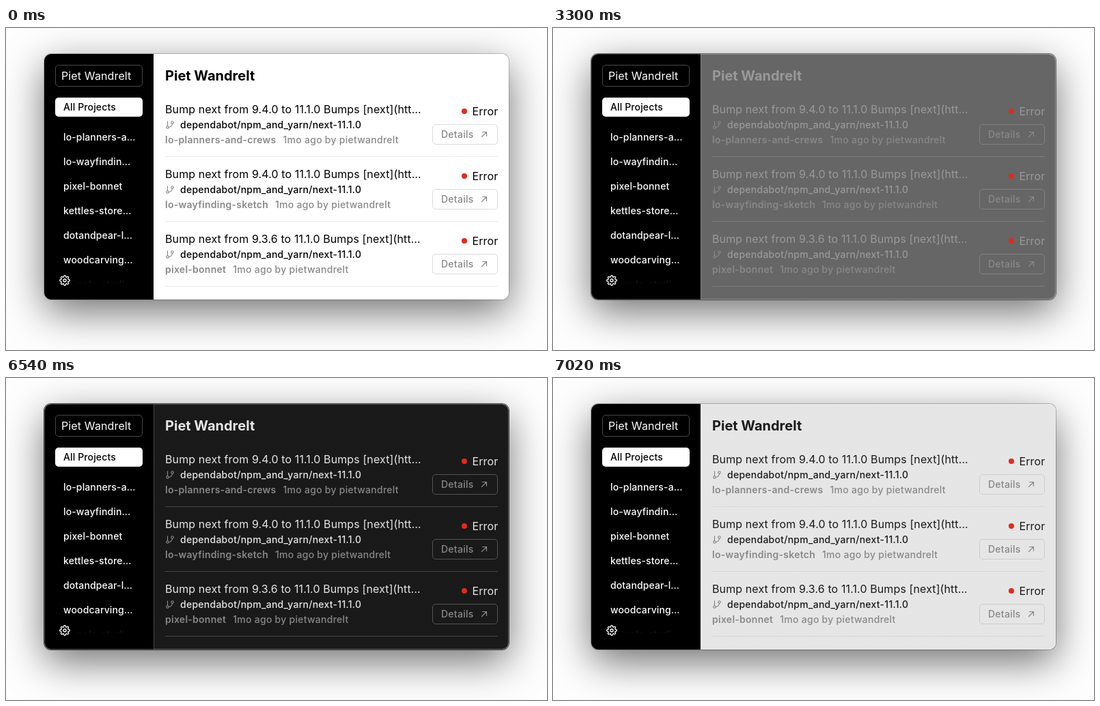
Recreate the animation shown at these times as an HTML page. Size 792 by 472 pixels, loop 7.08 s.

```html
<!DOCTYPE html>
<html lang="en">
<head>
<meta charset="utf-8">
<title>Deployments theme toggle</title>
<style>
  /* 0% is the light theme, 100% the dark one */
  @property --mix {
    syntax: "<percentage>";
    inherits: true;
    initial-value: 0%;
  }

  html, body {
    margin: 0;
    width: 100%;
    height: 100%;
    overflow: hidden;
    background: #fefefe;
  }

  .stage {
    --bg: color-mix(in srgb, #000 var(--mix), #fff);
    --fg: color-mix(in srgb, #fff var(--mix), #000);
    --rule: color-mix(in srgb, #333 var(--mix), #eaeaea);
    --outline: color-mix(in srgb, #444 var(--mix), #dcdcdc);
    --split: color-mix(in srgb, #333 var(--mix), #fff);
    --main-edge: color-mix(in srgb, #4c4c4c var(--mix), #fff);
    --side-edge: color-mix(in srgb, #4c4c4c var(--mix), #000);
    --ring: color-mix(in srgb, rgb(0 0 0 / .75) var(--mix), rgb(0 0 0 / .2));
    position: relative;
    width: 792px;
    height: 472px;
    overflow: hidden;
    animation: theme 7080ms infinite;
  }

  @keyframes theme {
    0% { --mix: 0%; animation-timing-function: step-end; }
    42.3729% { --mix: 0%; animation-timing-function: steps(10, jump-start); }
    50.8475% { --mix: 100%; animation-timing-function: step-end; }
    92.3729% { --mix: 100%; animation-timing-function: steps(9, jump-start); }
    100% { --mix: 10%; }
  }

  .shadow {
    position: absolute;
    left: 56px;
    top: 38px;
    width: 680px;
    height: 360px;
    border-radius: 10px;
    box-shadow: 0 0 0 1px var(--ring), 0 18px 58px rgb(0 0 0 / .56);
  }

  svg { position: absolute; inset: 0; }
  text { font: 500 14px Inter, sans-serif; letter-spacing: .26px; fill: var(--fg); }
  .large { font-size: 16px; font-weight: 400; letter-spacing: .11px; }
  .heading { font-size: 20px; font-weight: 700; letter-spacing: 0; }
  .muted { fill: #888; }
  .strong { font-weight: 600; }
  .side text { fill: #fff; letter-spacing: .13px; }
  .side .active { fill: #000; }
  .side .faded { fill: #1a1a1a; }
  .icon { fill: none; stroke: #888; stroke-linecap: round; stroke-linejoin: round; }
  .gear { stroke: #fff; stroke-width: 2; }
  .rule { stroke: var(--rule); }
  .button { fill: none; stroke: var(--outline); }
</style>
</head>
<body>
<div class="stage">
  <div class="shadow"></div>
  <svg width="792" height="472" viewBox="0 0 792 472">
    <defs>
      <linearGradient id="fill" gradientUnits="userSpaceOnUse" x1="0" x2="432">
        <stop offset=".5" stop-color="#000"/>
        <stop offset=".5" style="stop-color: var(--bg)"/>
      </linearGradient>
      <linearGradient id="edge" gradientUnits="userSpaceOnUse" x1="0" x2="432">
        <stop offset=".5" style="stop-color: var(--side-edge)"/>
        <stop offset=".5" style="stop-color: var(--main-edge)"/>
      </linearGradient>
      <clipPath id="peek"><rect x="102" y="364" width="72" height="9.5"/></clipPath>

      <!-- parts shared by every deployment row -->
      <g id="row">
        <g class="icon" stroke-width="2" transform="translate(233 135) scale(.583)">
          <path d="M6 3v12M18 9a9 9 0 0 1-9 9"/>
          <circle cx="18" cy="6" r="3"/>
          <circle cx="6" cy="18" r="3"/>
        </g>
        <text x="255" y="147">dependabot/npm_and_yarn/next-11.1.0</text>
        <circle cx="671" cy="122" r="4" fill="#e02b1d"/>
        <text class="large" x="682.5" y="128">Error</text>
        <rect class="button" x="624.5" y="141.5" width="95" height="29" rx="4.5"/>
        <text class="muted" x="637" y="161">Details</text>
        <path class="icon" stroke-width="1.2" d="M696.5 159.5l7-7M697.5 152.5h6v6"/>
        <path class="rule" d="M233 188.5h487"/>
      </g>
      <path id="tooth" d="M19.4 15a1.65 1.65 0 0 0 .33 1.82l.06.06a2 2 0 0 1-2.83 2.83l-.06-.06A1.65 1.65 0 0 0 15 19.4 1.65 1.65 0 0 0 14 20.91V21a2 2 0 0 1-4 0v-.09A1.65 1.65 0 0 0 9 19.4"/>
    </defs>

    <rect x="56.5" y="38.5" width="679" height="359" rx="9.5" fill="url(#fill)" stroke="url(#edge)"/>
    <path d="M216.5 39v358" style="stroke: var(--split)"/>

    <g class="side">
      <rect x="72.5" y="54.5" width="127" height="31" rx="4.5" fill="none" stroke="#484848"/>
      <text class="large" x="81" y="76">Piet Wandrelt</text>
      <rect x="72" y="102" width="128" height="28" rx="5" fill="#fff"/>
      <text class="active" x="84" y="121">All Projects</text>
      <text x="84" y="165">lo-planners-a…</text>
      <text x="84" y="201">lo-wayfindin…</text>
      <text x="84" y="237">pixel-bonnet</text>
      <text x="84" y="273">kettles-store…</text>
      <text x="84" y="309">dotandpear-l…</text>
      <text x="84" y="345">woodcarving…</text>
      <g clip-path="url(#peek)"><text class="faded" x="84" y="381">sample-studio-kit</text></g>
      <g class="icon gear" transform="translate(78 362) scale(.667)">
        <circle cx="12" cy="12" r="3"/>
        <use href="#tooth"/>
        <use href="#tooth" transform="rotate(90 12 12)"/>
        <use href="#tooth" transform="rotate(180 12 12)"/>
        <use href="#tooth" transform="rotate(270 12 12)"/>
      </g>
    </g>

    <text class="heading" x="233" y="77">Piet Wandrelt</text>

    <g>
      <use href="#row"/>
      <text class="large" x="233" y="125">Bump next from 9.4.0 to 11.1.0 Bumps [next](htt…</text>
      <text class="muted" x="233" y="169"><tspan class="strong">lo-planners-and-crews</tspan><tspan dx="10">1mo ago by pietwandrelt</tspan></text>
    </g>
    <g transform="translate(0 95)">
      <use href="#row"/>
      <text class="large" x="233" y="125">Bump next from 9.4.0 to 11.1.0 Bumps [next](htt…</text>
      <text class="muted" x="233" y="169"><tspan class="strong">lo-wayfinding-sketch</tspan><tspan dx="10">1mo ago by pietwandrelt</tspan></text>
    </g>
    <g transform="translate(0 190)">
      <use href="#row"/>
      <text class="large" x="233" y="125">Bump next from 9.3.6 to 11.1.0 Bumps [next](htt…</text>
      <text class="muted" x="233" y="169"><tspan class="strong">pixel-bonnet</tspan><tspan dx="10">1mo ago by pietwandrelt</tspan></text>
    </g>
  </svg>
</div>
</body>
</html>
```
